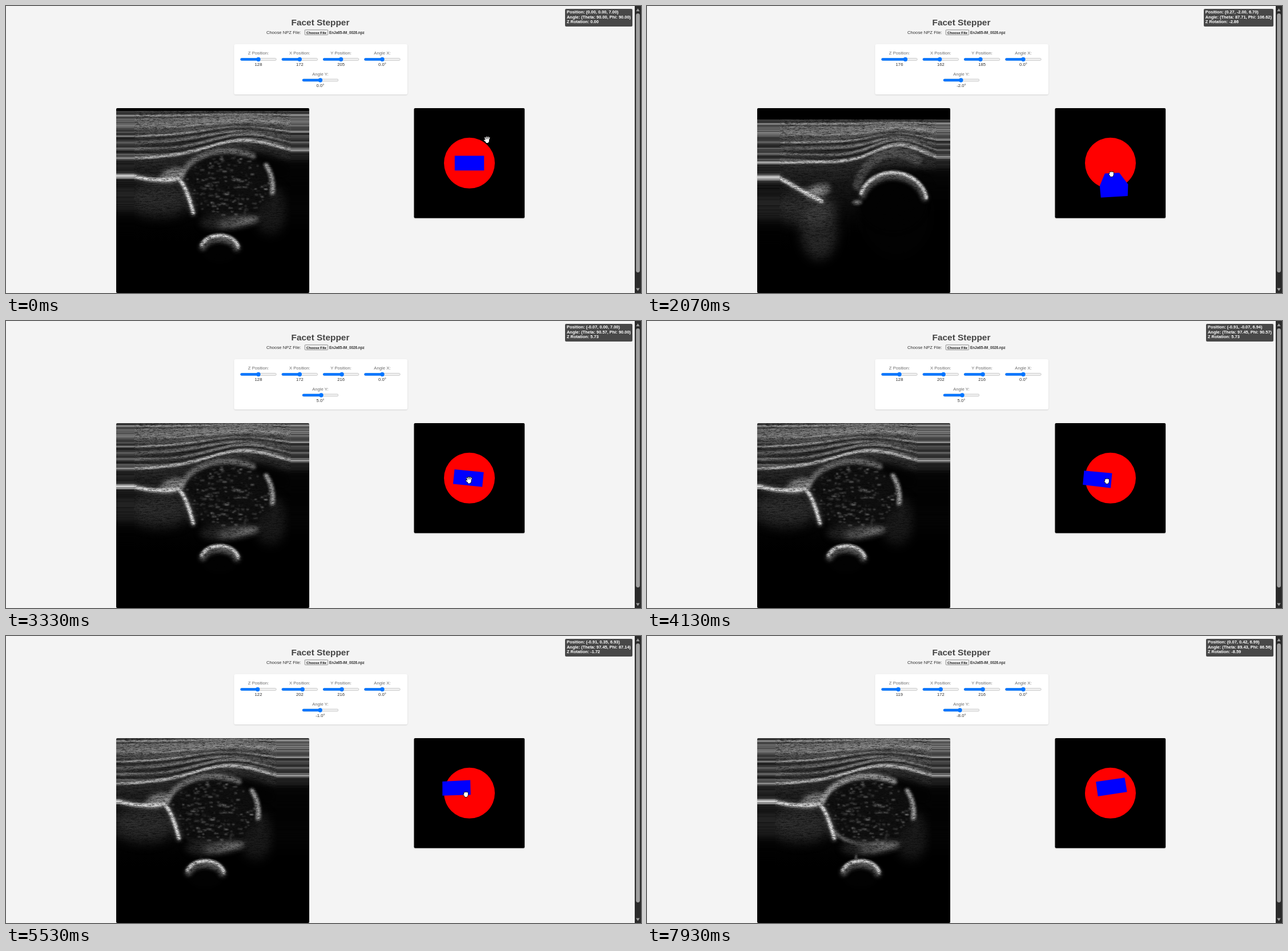
These frames come from a looping animation (1112 by 503 pixels, 8270 ms). An HTML page with a canvas:

```html
<!DOCTYPE html>
<html lang="en">
<head>
<meta charset="utf-8">
<title>Facet Stepper</title>
<style>
  html, body { margin: 0; width: 100%; height: 100%; overflow: hidden; background: #f4f4f4; }
  body { position: relative; font-family: Arial, "Liberation Sans", sans-serif; }
  svg, canvas, #info { position: absolute; }
  svg { left: 0; top: 0; }
  canvas { left: 193px; top: 179px; border-radius: 2px; box-shadow: 0 1px 2px rgba(0,0,0,.15); }
  text { font-family: Arial, "Liberation Sans", sans-serif; font-size: 7.7px; }
  #info {
    right: 15.5px; top: 5px; padding: 1.9px 2.5px 2.7px; border-radius: 2px; white-space: pre;
    background: rgba(0,0,0,.7); color: #fff; font-size: 7.44px; font-weight: bold; line-height: 8.75px;
  }
</style>
</head>
<body>
<canvas id="scan" width="338" height="324"></canvas>
<svg width="1112" height="503" viewBox="0 0 1112 503">
  <defs>
    <filter id="soft" x="-5%" y="-5%" width="110%" height="115%">
      <feDropShadow dx="0" dy="1" stdDeviation="1" flood-opacity=".14"/>
    </filter>
  </defs>
  <text x="550.5" y="34.3" text-anchor="middle" fill="#444" style="font-size:15.4px;font-weight:bold">Facet Stepper</text>
  <text x="456" y="48.8" fill="#333">Choose NPZ File:</text>
  <rect x="523.3" y="41.8" width="40.4" height="8.8" rx="1" fill="#efefef" stroke="#767676" stroke-width=".8"/>
  <text x="543.5" y="48.5" text-anchor="middle" fill="#111" style="font-size:6.2px;font-weight:bold">Choose File</text>
  <text x="566" y="48.5" fill="#333" style="font-size:6.35px;font-weight:bold">EnJa65-IM_0026.npz</text>
  <rect x="399.5" y="67" width="303.5" height="88" rx="3" fill="#fff" filter="url(#soft)"/>
  <g id="sliders"></g>
  <rect x="714.5" y="179" width="193.7" height="192.7" rx="2" filter="url(#soft)"/>
  <circle cx="811.5" cy="275.3" r="44.5" fill="#f00"/>
  <path id="probe" fill="#00f"/>
  <g id="pointer" stroke-linecap="round" stroke-linejoin="round">
    <path id="rim" stroke="#000"/>
    <path id="skin" fill="#fff" stroke="#fff"/>
  </g>
  <rect x="1101" width="11" height="503" fill="#2b2b2b"/>
  <rect x="1103.2" y="13" width="6.8" height="454" rx="3.4" fill="#9f9f9f"/>
  <path d="M1103.3 9.3h6.4l-3.2-5zM1103.3 494.5h6.4l-3.2 5z" fill="#9f9f9f"/>
</svg>
<div id="info"></div>
<script>
const LOOP = 8270, FPS = 15, TICK = 0.01;
const byId = id => document.getElementById(id);
const clamp = v => Math.max(0, Math.min(1, v));
const lerp = (a, b, k) => a + (b - a) * k;
const smooth = k => k * k * (3 - 2 * k);
const deg = n => n * TICK * 180 / Math.PI;
const rng = seed => () => (seed = (seed * 16807) % 2147483647) / 2147483647;

// theta, phi and roll in ticks, y in voxels; each pose inherits from the one before
const POSES = [{ at: 0, t: 0, p: 0, r: 0, y: 205 }];
for (const change of [
  { at: 9 },
  { at: 21, t: 19, p: -5, r: -15 },
  { at: 31, t: -4, p: 29, r: -5, y: 185 },
  { at: 50, t: 1, p: 0, r: 10, y: 216 },
  { at: 72, t: 22, p: 1 },
  { at: 93, t: 5, p: -11, r: -15 },
  { at: 101, t: -3, p: -9 },
  { at: 113, t: -1, p: -6 },
  { at: 125 }
]) POSES.push({ ...POSES.at(-1), ...change });

function poseAt(step) {
  const i = POSES.findIndex(pose => step < pose.at);
  const a = POSES[i - 1], b = POSES[i];
  const k = smooth((step - a.at) / (b.at - a.at));
  const [t, p, r, y] = ["t", "p", "r", "y"].map(n => Math.round(lerp(a[n], b[n], k)));
  return {
    t, p, r, y,
    z: 128 + 3 * Math.trunc(deg(p)),
    x: 172 + 10 * Math.trunc(deg(t) / 2),
    tilt: Math.trunc(deg(r))
  };
}

// sliders
function makeSlider(label, cx, top, max, min = 0, unit) {
  const g = document.createElementNS("http://www.w3.org/2000/svg", "g");
  const y = top + 11;
  g.innerHTML = `<text x="${cx}" y="${top + 2.6}" text-anchor="middle" fill="#6d6d6d">${label}</text>
    <rect x="${cx - 31.3}" y="${y - 2}" width="62.6" height="4" rx="2" fill="#efefef" stroke="#b2b2b2" stroke-width=".6"/>
    <rect x="${cx - 31.6}" y="${y - 2.3}" height="4.6" rx="2.3" fill="#0075ff"/>
    <circle cy="${y}" r="3.7" fill="#0075ff"/>
    <text x="${cx}" y="${top + 22.7}" text-anchor="middle" fill="#333"></text>`;
  byId("sliders").append(g);
  const [, , fill, thumb, value] = g.children;
  return v => {
    const pos = 4 + 55.6 * (v - min) / (max - min);
    fill.setAttribute("width", pos);
    thumb.setAttribute("cx", cx - 31.8 + pos);
    value.textContent = unit ? v.toFixed(1) + unit : v;
  };
}
const column = i => 442 + 72.3 * i;
const setZ = makeSlider("Z Position:", column(0), 82.5, 256);
const setX = makeSlider("X Position:", column(1), 82.5, 344);
const setY = makeSlider("Y Position:", column(2), 82.5, 410);
const setAX = makeSlider("Angle X:", column(3), 82.5, 90, -90, "°");
const setAY = makeSlider("Angle Y:", column(1.5), 119, 90, -90, "°");

// probe in perspective
function outline(pts) {
  const area = pts.reduce((sum, [x, y], i) => {
    const [nx, ny] = pts[(i + 1) % pts.length];
    return sum + x * ny - nx * y;
  }, 0);
  const order = area < 0 ? [...pts].reverse() : pts;
  return "M" + order.map(q => q.map(v => v.toFixed(2))).join("L") + "Z";
}

function drawProbe({ t, p, r }) {
  const th = Math.PI / 2 + t * TICK, ph = Math.PI / 2 + p * TICK, a = r * TICK;
  const d = [Math.sin(ph) * Math.cos(th), Math.cos(ph), Math.sin(ph) * Math.sin(th)];
  const n = Math.hypot(d[0], d[2]);
  const side = [d[2] / n, 0, -d[0] / n];
  const up = [d[1] * side[2], d[2] * side[0] - d[0] * side[2], -d[1] * side[0]];
  const c = Math.cos(a), s = Math.sin(a);
  const corner = (dist, w, h) => {
    const u = w * c + h * s, v = h * c - w * s;
    const [x, y, z] = d.map((q, i) => q * dist + side[i] * u + up[i] * v);
    const f = 126 / (12 - z);
    return [811.5 + x * f, 275.3 - y * f];
  };
  const face = (dist, w) =>
    [[-1, 1], [1, 1], [1, -1], [-1, -1]].map(([i, j]) => corner(dist, i * w, j * w / 2));
  const near = face(7.1, 1), far = face(4.8, .73);
  const sides = near.map((q, i) => {
    const j = (i + 1) % 4;
    return outline([q, near[j], far[j], far[i]]);
  });
  byId("probe").setAttribute("d", outline(near) + sides.join(""));
  const f2 = v => v.toFixed(2);
  byId("info").textContent =
    `Position: (${d.map(v => f2(v * 7)).join(", ")})\n` +
    `Angle: (Theta: ${f2(90 + deg(t))}, Phi: ${f2(90 + deg(p))})\nZ Rotation: ${f2(deg(r))}`;
}

// pointer
function hand(spread, reach) {
  let path = `M-2.5 .5h5.2v2.6l-1.4 2.1h-2.6zM-2.4 3.2l${-.5 * reach} ${-.4 * reach}`;
  for (let i = 0; i < 4; i++) {
    const a = (i - 1.4) * spread, len = reach * (i % 3 ? 1 : .8);
    path += `M${(i - 1.4) * 1.7} .5l${Math.sin(a) * len} ${-Math.cos(a) * len}`;
  }
  return path;
}
const SHAPES = {
  open: [hand(.22, 5), 1.5],
  closed: [hand(.03, 2.2), 1.6],
  arrow: ["M-3-5v9l2-1.8 1.6 3.2 1.3-.7-1.6-3h2.8z", .3]
};
function drawPointer(step, { t, p }) {
  let x = 811.5 - .47 * t, y = 278.5 + .5 * p;
  const enter = smooth(clamp(step / 6)), leave = clamp((step - 112) / 6);
  x = lerp(lerp(842.5, x, enter), 80, leave);
  y = lerp(lerp(234, y, enter), 515, leave);
  const idle = step < 9 || Math.abs(step - 50) < 4 || step > 112;
  const kind = x < 714 ? "arrow" : idle ? "open" : "closed";
  const [path, w] = SHAPES[kind];
  byId("pointer").setAttribute("transform", `translate(${x} ${y})`);
  for (const [id, width] of [["rim", w + 1.5], ["skin", w]]) {
    byId(id).setAttribute("d", path);
    byId(id).setAttribute("stroke-width", width);
  }
}

// soft layered scan
const W = 277, H = 332, PI = Math.PI;
const makeLayer = () => Object.assign(document.createElement("canvas"), { width: W, height: H });
const view = byId("scan").getContext("2d");
const layer = makeLayer(), grain = makeLayer();
const g = layer.getContext("2d");
const gray = (v, a = 1) => `rgba(${v},${v},${v},${a})`;

function makeGrain() {
  const ctx = grain.getContext("2d"), img = ctx.createImageData(W, H), rand = rng(41);
  let v = .5;
  for (let i = 0; i < W * H; i++) {
    v = lerp(v, rand(), .3);
    img.data.fill(255 * clamp(.86 + (v - .5) * 1.6), i * 4, i * 4 + 3);
    img.data[i * 4 + 3] = 255;
  }
  ctx.putImageData(img, 0, 0);
}
makeGrain();

function stroke(width, color, blur) {
  g.filter = `blur(${blur}px)`;
  g.lineWidth = width;
  g.strokeStyle = color;
  g.stroke();
}
function wave(fn, width, color, blur) {
  g.beginPath();
  for (let u = -8; u <= W + 8; u += 8) g.lineTo(u, fn(u));
  stroke(width, color, blur);
}
function arc(cx, cy, rx, ry, from, to, width, color, blur) {
  g.beginPath();
  g.ellipse(cx, cy, rx, ry, 0, from * PI, to * PI);
  stroke(width, color, blur);
}
function blob(x, y, rx, ry, color, blur, turn = 0) {
  g.filter = `blur(${blur}px)`;
  g.fillStyle = color;
  g.beginPath();
  g.ellipse(x, y, rx, ry, turn, 0, 2 * PI);
  g.fill();
}

function drawTissue(k) {
  const base = g.createLinearGradient(0, 5, 0, 235);
  for (let s = 0; s <= 1; s += .1) base.addColorStop(s, gray(Math.round(95 * (1 - s) ** 1.9)));
  g.filter = "none";
  g.fillStyle = base;
  g.fillRect(0, 5, W, 230);

  const mid = lerp(195, 210, k), spread = lerp(90, 60, k);
  const fascia = u => lerp(87, 80, k) - 31 * Math.exp(-(((u - mid) / spread) ** 2));
  const rand = rng(977);
  for (let i = 0; i < 26; i++) {
    const f = i / 25, tone = Math.round(25 + 200 * rand());
    const phase = rand() * 6, width = 1.2 + rand() * 2.6;
    wave(u => lerp(7, fascia(u), f) + Math.sin(u / 38 + phase) * 2 * f, width, gray(tone, .72), .8);
  }
  for (let i = 1; i < 9; i++) {
    wave(u => fascia(u) + i * 5 + Math.sin(u / 30 + i) * 2, 2, gray(Math.round(15 + rand() * 50), .6), 1);
  }
  const fade = g.createLinearGradient(130, 0, W, 0);
  fade.addColorStop(0, gray(0, 0));
  fade.addColorStop(.7, gray(0, .82));
  g.filter = "blur(4px)";
  g.fillStyle = fade;
  g.fillRect(130, 92, 160, 240);
  wave(fascia, 4, gray(205, .85), 1.1);
}

function drawHead(k, q) {
  const shown = 1 - smooth(k);
  blob(236, 101, 44, 20, gray(3, .9 * shown), 6, .35);
  blob(240, 178, 28, 42, gray(60, .45 * shown), 9);
  blob(166, 135, 76, 57, gray(16, shown), 4);
  blob(205, 172, 62, 75, gray(2, k), 9);
  arc(lerp(165, 205, k), lerp(134, 140, k), lerp(84, 70, k), lerp(59, 76, k), 1.08, 1.68,
    lerp(10, 16, k), gray(Math.round(lerp(120, 175, q)), lerp(.85, .5, k)), 2.2);
  const rand = rng(2024);
  g.filter = "blur(.8px)";
  for (let i = 0; i < 230; i++) {
    const a = rand() * 2 * PI, r = Math.sqrt(rand());
    g.fillStyle = gray(Math.round(70 + rand() * 130), rand() * .85 * shown);
    g.fillRect(163 + Math.cos(a) * r * 72, 135 + Math.sin(a) * r * 53, 2 + rand() * 6, 2);
  }
  arc(166, 135, 78, 60, .4, .85, 6, gray(150, .75 * q), 2);
  arc(212, 140, 32, 52, 1.72, 2.05, 8, gray(195, .85 * shown), 2);
  blob(184, 199, 37, 9, gray(140, .8 * shown), 4, -.15);
  blob(150, 200, 33, 13, gray(60, .6 * shown), 6);
}

function drawBone(k, q) {
  blob(45, 160, 55, 30, gray(80, .5), 10);
  blob(70, 200, 32, 50, gray(90, .45 * k), 9);
  blob(68, lerp(117, 130, k), 22, 11, gray(185, .7), 5, -.3);

  const kneeX = lerp(78, 72, k), kneeY = lerp(123, 147, k);
  g.beginPath();
  g.moveTo(-8, lerp(117, 102, k));
  g.quadraticCurveTo(40, lerp(131, 130, k), kneeX, kneeY);
  g.quadraticCurveTo(kneeX + lerp(14, 1, k), kneeY + 10 * (1 - k), lerp(105, 75, k), lerp(184, 148, k));
  stroke(11, gray(130, .5), 3);
  stroke(6, gray(240, .95), 1.5);

  const cap = [lerp(151, 200, k), lerp(247, 150, k), lerp(33, 59, k), lerp(24, 52, k)];
  blob(...cap, gray(2), 3);
  const [cx, cy, rx, ry] = cap;
  arc(cx, cy + 3, rx - 2, ry - 3, 1.1, 1.93, 12, gray(120, .75), 3);
  arc(...cap, 1.1, 1.95, 6, gray(235, .95), 1.4);
  blob(cx - 8, cy - ry - 6, 2, 6, gray(150, .7 * q), 1.5);
  blob(cx - rx - 4, cy, 9, 4, gray(180, .7 * k), 2);
}

function drawScan({ x, y, z, tilt }) {
  const k = clamp((z - 128) / 48), q = clamp(-tilt / 8) * (1 - k);
  g.globalCompositeOperation = "source-over";
  g.filter = "none";
  g.lineCap = g.lineJoin = "round";
  g.fillStyle = "#000";
  g.fillRect(0, 0, W, H);
  drawTissue(k);
  drawHead(k, q);
  drawBone(k, q);
  g.filter = "none";
  g.fillStyle = "#000";
  g.fillRect(0, 0, W, 5);
  g.globalCompositeOperation = "multiply";
  g.drawImage(grain, 0, 0);

  // edge columns smear outwards beyond the volume
  const left = Math.round(30 - (x - 172) * .83), top = Math.round((205 - y) * .75);
  const right = left + W;
  view.imageSmoothingEnabled = false;
  view.fillStyle = "#000";
  view.fillRect(0, 0, 338, 324);
  view.drawImage(layer, left, top);
  if (left > 0) view.drawImage(layer, 0, 0, 1, H, 0, top, left, H);
  if (right < 338) view.drawImage(layer, W - 1, 0, 1, H, right, top, 338 - right, H);
}

let shownStep = -1, scanKey = "";
function render(ms) {
  const step = Math.min(119, Math.floor((ms % LOOP + 5) * FPS / 1000));
  if (step === shownStep) return;
  shownStep = step;
  const pose = poseAt(step);
  setZ(pose.z);
  setX(pose.x);
  setY(pose.y);
  setAX(0);
  setAY(pose.tilt);
  drawProbe(pose);
  drawPointer(step, pose);
  const key = [pose.x, pose.y, pose.z, pose.tilt].join();
  if (key !== scanKey) drawScan(pose);
  scanKey = key;
}

const start = performance.now();
function tick() {
  render(performance.now() - start);
  requestAnimationFrame(tick);
}
tick();
</script>
</body>
</html>
```
